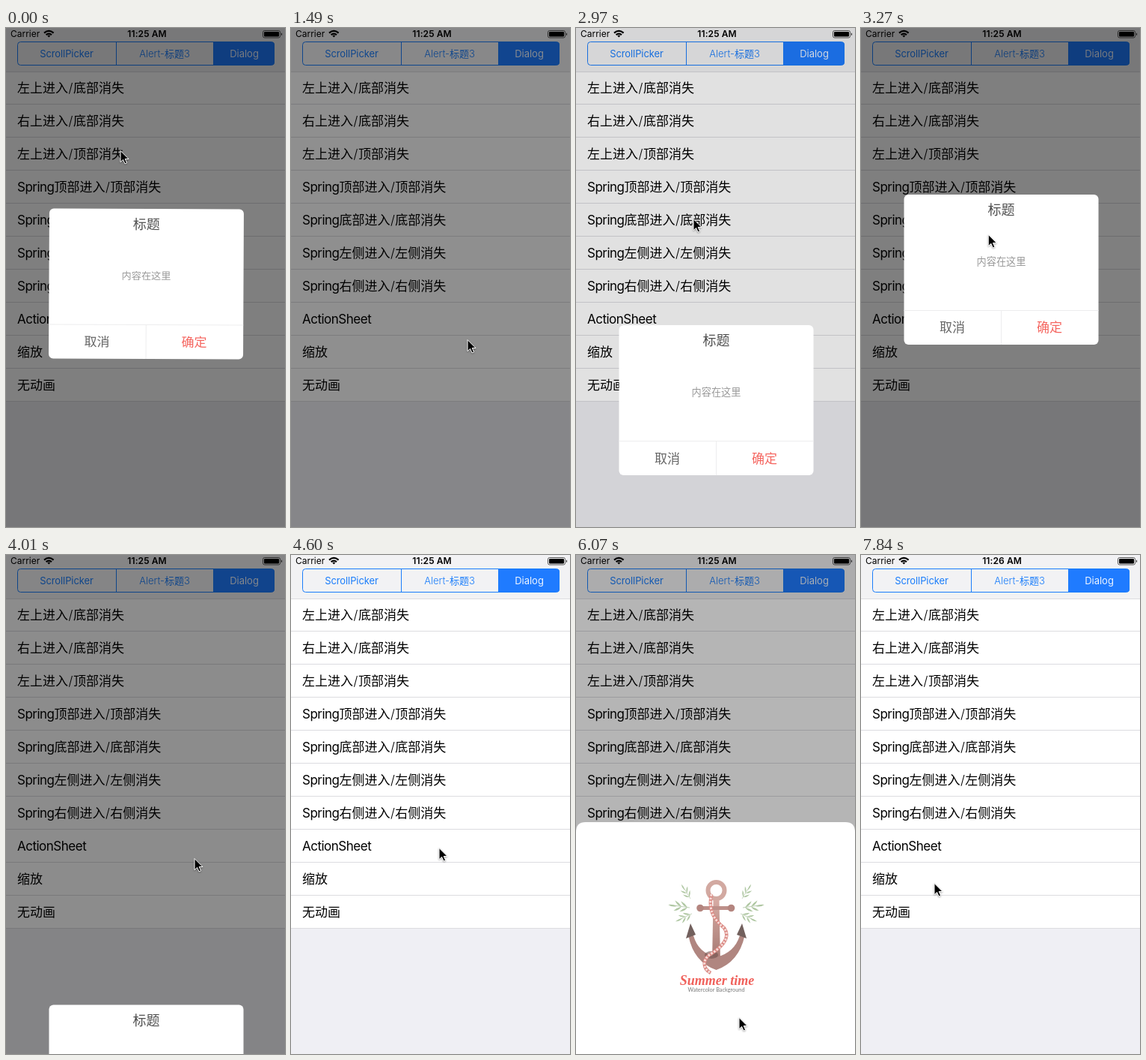
Recreate the animation shown at these times as an HTML page. Size 373 by 665 pixels, loop 8000 ms.

```html
<!DOCTYPE html>
<html lang="zh-CN">
<head>
<meta charset="utf-8">
<title>Dialog transitions</title>
<style>
html, body { margin: 0; width: 100%; height: 100%; overflow: hidden; background: #efeff4; }
svg { display: block; width: 100vw; height: 100vh; }
text { font-family: Inter, "Noto Sans CJK SC", "Noto Sans CJK", sans-serif; }
.mid { text-anchor: middle; }
.han { font-weight: 350; }
.row { font-size: 17px; }
.latin { letter-spacing: -.5px; }
.tab { font-size: 13px; fill: #1a7dfb; }
.rule { stroke: #dcdce0; }
#rope path { fill: none; }
#cursor { filter: drop-shadow(0 1px 1px rgba(0, 0, 0, .35)); }
</style>
</head>
<body>
<svg viewBox="0 0 373 665">
  <rect width="373" height="665" fill="#efeff4"/>
  <rect width="373" height="58" fill="#f2f2f4"/>

  <g id="status">
    <text x="6" y="12.3" font-size="12">Carrier</text>
    <g fill="none" stroke="#000" stroke-width="2.2">
      <path d="M51 6.6Q57.3 1 63.6 6.6M53.6 9.2Q57.3 6 61 9.2"/>
      <path d="M55.3 10.2Q57.3 8.8 59.3 10.2L57.3 12.6Z" fill="#000" stroke="none"/>
    </g>
    <text id="clock" class="mid" x="188.5" y="12.3" font-size="12" font-weight="600" letter-spacing=".1">11:25 AM</text>
    <rect x="343.5" y="3.5" width="23" height="9.5" rx="2.2" fill="none" stroke="#555"/>
    <rect x="345" y="5" width="20" height="6.5" rx="1"/>
    <path d="M368 6.3Q370 8.2 368 10.2Z"/>
  </g>

  <g id="tabs">
    <path d="M277.5 18.5H355a4 4 0 0 1 4 4V45.5a4 4 0 0 1-4 4H277.5Z" fill="#1f7bff"/>
    <rect x="15.5" y="18.5" width="343" height="31" rx="4" fill="none" stroke="#1a7dfb"/>
    <path d="M147.5 18V50M277.5 18V50" stroke="#1a7dfb"/>
    <text class="tab mid" x="81" y="38.7" letter-spacing="-.1">ScrollPicker</text>
    <text class="tab mid han" x="212" y="38.7">Alert-标题3</text>
    <text class="tab mid" x="318.5" y="38.7" style="fill:#edf4ff">Dialog</text>
  </g>

  <g id="list"></g>
  <rect id="dim" width="373" height="665" opacity="0"/>

  <g id="dialog">
    <rect x="57.5" width="260" height="200" rx="6" fill="#fff"/>
    <path d="M57.5 154.5H317.5M187.5 154.5V200" stroke="#ededee"/>
    <g class="mid han">
      <text x="187.5" y="27" font-size="18" fill="#505050">标题</text>
      <text x="187.5" y="94" font-size="13.2" fill="#999">内容在这里</text>
      <text x="122" y="183.5" font-size="17" fill="#666">取消</text>
      <text x="252" y="183.5" font-size="17" fill="#f5655f">确定</text>
    </g>
  </g>

  <g id="sheet">
    <defs>
      <linearGradient id="iron" x1="0" y1="0" x2="0" y2="1">
        <stop offset="0" stop-color="#d6aaa3"/>
        <stop offset="1" stop-color="#a37770"/>
      </linearGradient>
      <path id="leaf" d="M0 0Q6 -3.4 12 0Q6 1.6 0 0"/>
      <g id="sprig" fill="#afc7a2">
        <path d="M0 0H20" stroke="#a9bf9e" stroke-width=".7"/>
        <use href="#leaf" x="17"/>
        <g id="pair">
          <use href="#leaf" transform="translate(11) rotate(-36)"/>
          <use href="#leaf" transform="translate(11) rotate(36)"/>
        </g>
        <use href="#pair" x="-8"/>
      </g>
      <g id="leaves">
        <use href="#sprig" transform="translate(153 102) rotate(-122) scale(.78)"/>
        <use href="#sprig" transform="translate(152 114) rotate(188)"/>
        <use href="#sprig" transform="translate(155 122) rotate(155) scale(.84)"/>
      </g>
    </defs>
    <path d="M0 380V13Q0 0 13 0H360Q373 0 373 13V380Z" fill="#fff"/>
    <use href="#leaves"/>
    <use href="#leaves" transform="matrix(-1 0 0 1 375 0)"/>
    <circle cx="187.5" cy="91" r="11" fill="none" stroke="#d2a9a1" stroke-width="6"/>
    <path d="M183.5 104H191.5L193 187H182Z" fill="url(#iron)"/>
    <path d="M166 112H208V117H166Z" fill="#bd908a"/>
    <circle cx="166" cy="114.5" r="4.8" fill="#b4857f"/>
    <circle cx="207.5" cy="114.5" r="4.8" fill="#b4857f"/>
    <path d="M150 149Q156 186 187.5 197Q219 186 226 149L219 151Q212 174 187.5 180Q163 174 157 151Z" fill="#b08680"/>
    <path d="M153 135L147 155L160 150ZM222 135L228 155L215 150Z" fill="#72605d"/>
    <ellipse cx="181" cy="177" rx="9" ry="5" fill="#73534f" opacity=".6"/>
    <g id="rope">
      <path id="strand" d="M181 96C176 120 187 132 198 141C207 153 196 165 183 174C169 181 168 194 180 201" stroke="#d98680" stroke-width="4.4"/>
      <use href="#strand" id="twist"/>
    </g>
    <text class="mid" x="188.5" y="217" fill="#f0615b" style="font:italic bold 18px 'Liberation Serif',serif">Summer time</text>
    <text class="mid" x="187.5" y="226" fill="#777" style="font:7.35px Lato,sans-serif">Watercolor Background</text>
  </g>

  <path id="cursor" d="M1 .5V15.7L4.6 12.4L7 17.9L9.6 16.8L7.2 11.5H12Z" stroke="#fff"/>
</svg>

<script>
const LOOP = 8000, TICK = 147.9, BOTTOM = 670, DIM = .5;
const $ = id => document.getElementById(id);

// List rows: Latin prefix and Chinese label.
const path = (a, b) => `${a}进入/${b}消失`;
const spring = s => ['Spring', path(s, s.replace('侧', '侧'))];
const rows = [
  ['', path('左上', '底部')], ['', path('右上', '底部')], ['', path('左上', '顶部')],
  ...['顶部', '底部', '左侧', '右侧'].map(spring),
  ['ActionSheet', ''], ['', '缩放'], ['', '无动画']
];
const slash = s => s.replace(/\/(.*)/, '<tspan dx=".5">/</tspan><tspan dx=".5">$1</tspan>');

$('list').innerHTML = '<path d="M0 58H373V498H0Z" fill="#fff"/><path class="rule" d="M0 58.5H373"/>' +
  rows.map(([latin, han], i) =>
    `<g class="row" transform="translate(0 ${58 + 44 * i})">` +
    `<text class="latin" x="15" y="28">${latin}</text>` +
    `<text class="han" x="${latin ? 64.4 : 15}" y="28">${slash(han)}</text>` +
    '<path class="rule" d="M0 43.5H373"/></g>').join('');

// The rope's light strands.
$('twist').outerHTML = `<path d="${$('strand').getAttribute('d')}" stroke="#f6dcd8" stroke-width="3" stroke-dasharray="2.6 1.8"/>`;

const clamp = v => Math.min(1, Math.max(0, v));
const smooth = v => { const p = clamp(v); return p * p * (3 - 2 * p); };
const easeOut = v => 1 - (1 - clamp(v)) ** 2;
const bounce = s => Math.exp(-7 * s) * Math.cos(6 * s);

const popups = [
  { id: 'dialog', rest: 241, exit: -320, open: -3000, close: 1361, hold: 0 },
  { id: 'dialog', rest: 241, exit: BOTTOM, open: 2847, close: 3888, hold: 0 },
  { id: 'sheet', rest: 356, exit: BOTTOM, open: 4780, close: 5826, hold: 250 }
];

// Pointer moves: start, end, x, y.
const moves = [
  [160, 1340, 235, 415], [1500, 2080, 156, 246], [2350, 2660, 156, 254],
  [3120, 3690, 251, 404], [4280, 4580, 197, 390], [5150, 5900, 217, 616],
  [6080, 6500, 203, 465], [6760, 7830, 97, 437]
];

const place = (id, x, y, extra = '') =>
  $(id).setAttribute('transform', `translate(${x} ${y})${extra}`);

function popupY(p, t) {
  if (t < p.close + p.hold) return p.rest + (BOTTOM - p.rest) * bounce((t - p.open) / 1000);
  return p.rest + (p.exit - p.rest) * easeOut((t - p.close - p.hold) / 177);
}

function draw(now) {
  // The screen refreshes once per tick.
  const t = Math.floor((now % LOOP) / TICK) * TICK;

  let dim = 0;
  const top = { dialog: BOTTOM, sheet: BOTTOM };
  for (const p of popups) {
    if (t < p.open) continue;
    top[p.id] = popupY(p, t);
    dim = Math.max(dim, smooth((t - p.open) / 350) * (1 - smooth((t - p.close) / 533)));
  }
  const tilt = .27 * Math.exp(-t / 30);
  place('dialog', 0, top.dialog, ` rotate(${tilt} 187.5 100)`);
  place('sheet', 0, top.sheet);
  $('dim').setAttribute('opacity', DIM * dim);

  let x = 152, y = 163;
  for (const [from, to, tx, ty] of moves) {
    const e = smooth((t - from) / (to - from));
    x += (tx - x) * e;
    y += (ty - y) * e;
  }
  place('cursor', x, y);
  $('clock').textContent = t < 7400 ? '11:25 AM' : '11:26 AM';
}

const start = performance.now();
function frame() {
  draw(performance.now() - start);
  requestAnimationFrame(frame);
}
frame();
</script>
</body>
</html>
```
